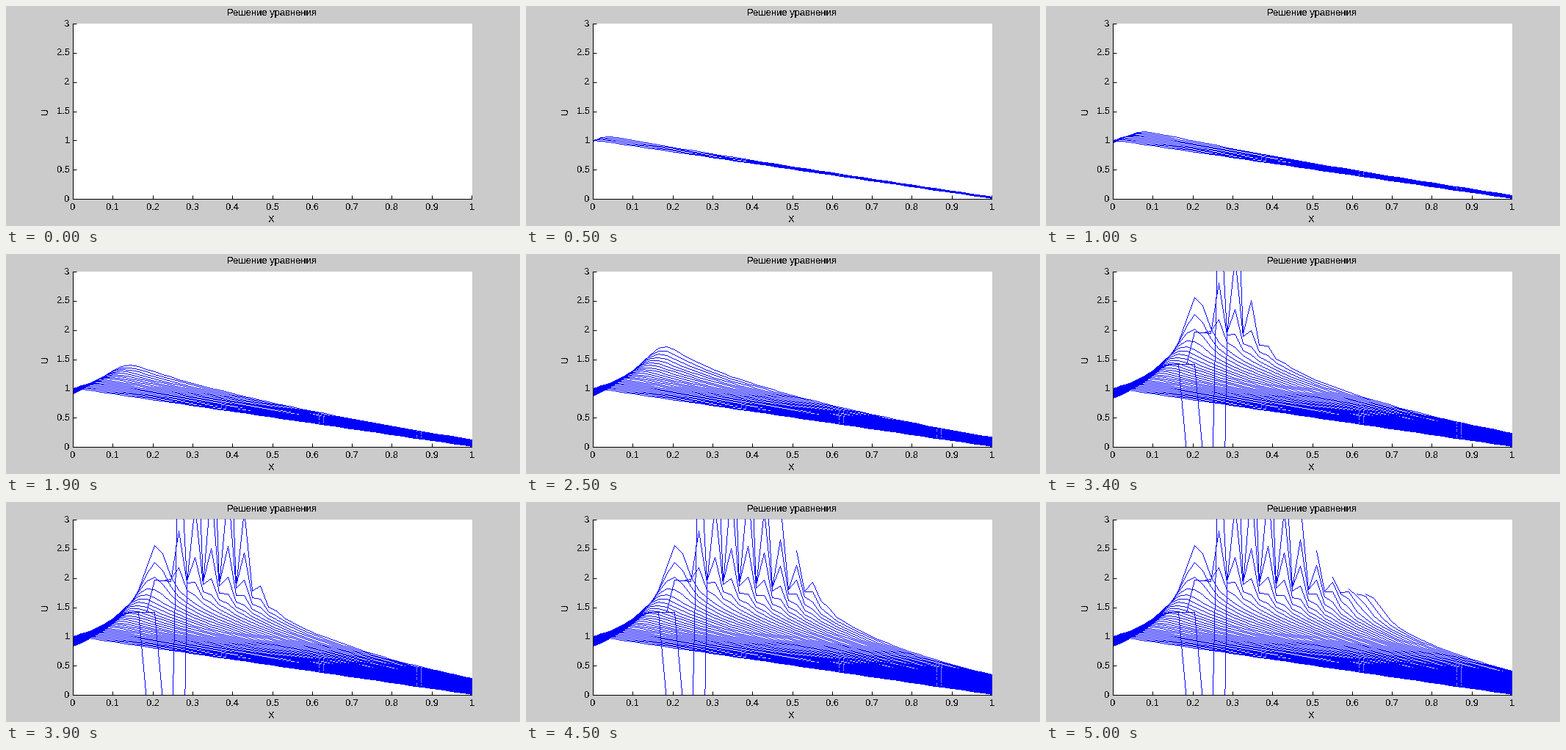
A matplotlib script for the animation above (5100 ms loop, 700 by 300 pixels).

```python
import numpy as np
import matplotlib.pyplot as plt
from matplotlib.animation import FuncAnimation

W, H, DPI = 700, 300, 100
LEFT, BOTTOM = 91, 37
AX_W, AX_H = 543, 239
U_MAX = 3
CURVES = 50
PX = 72 / DPI

plt.rcParams["font.family"] = "Liberation Sans"
plt.rcParams["font.size"] = 13 * PX
plt.rcParams["text.antialiased"] = False
plt.rcParams["path.simplify"] = False

cell = np.arange(50)
x = cell / 49

# Per step: advection speed, quadratic growth, fall of the inflow value
SPEED, GROWTH, DECAY = 0.0062, 0.0166, 0.0055
BREAK, LOST = 30, 34      # first unstable curve, first curve without a left part
FRONT = 19                # the overflow front of curve n is at cell n - FRONT


def smooth_wave(m):
    """Wave after m steps: the inflow branch meets the advected initial ramp."""
    inflow = 1 - DECAY * (m - x / SPEED)
    rise = inflow / np.maximum(1 - GROWTH / SPEED * x * inflow, 0.15)

    ramp = 1 - x + SPEED * m
    fall = ramp / np.maximum(1 - GROWTH * m * ramp, 0.2)
    fall = fall + 0.0053 * fall ** 8

    s = 0.01 * max(m, 1)
    u = -s * np.logaddexp(-rise / s, -fall / s)
    if m < BREAK - 1:
        peak = 0.05 * max(m - 24, 0) ** 1.6
        u += peak * np.exp(-((x - 0.21) / 0.03) ** 2)
    return u


def unstable_wave(n):
    """Sawtooth behind the front, with a collapsing wake on its left."""
    u = smooth_wave(n - 1)
    front = n - FRONT
    d = np.maximum(cell - front, 0)

    valley = 1.9 - 0.012 * (cell - 15)
    teeth = 4 * np.exp(-((n - 36) / 6) ** 2) * np.exp(-d / 1.15)
    teeth[(cell % 2 == 0) | (cell < 13)] = 0
    jagged = u + (valley - u) * np.exp(-(d / 2) ** 2) + teeth

    if n >= LOST:
        return np.where(cell < front, np.nan, jagged)
    edge = 10 - 2 * (n - 32)
    wake = np.minimum(u, 1.4 - 1.5 * np.maximum(cell - edge, 0))
    in_wake = (cell < front) & ((cell < 10) | (cell >= edge))
    return np.where(in_wake, wake, jagged)


def pixel_line(u):
    """Aliased one-pixel line as short dashes, one for each pixel."""
    col, row = np.rint(x * AX_W), np.rint(u / U_MAX * AX_H)
    cols, rows = [], []
    for c0, c1, r0, r1 in zip(col, col[1:], row, row[1:]):
        if np.isnan(r0 + r1):
            continue
        t = np.linspace(0, 1, int(max(c1 - c0, abs(r1 - r0))) + 1)
        cols.append(np.rint(c0 + (c1 - c0) * t))
        rows.append(np.rint(r0 + (r1 - r0) * t))
    cols, rows = np.concatenate(cols), np.concatenate(rows)
    shown = (rows >= 0) & (rows <= AX_H)
    cols, rows = cols[shown], rows[shown] + 0.5
    gap = np.full(len(cols), np.nan)
    xs = np.column_stack([cols, cols + 1, gap]).ravel() / AX_W
    ys = np.column_stack([rows, rows, gap]).ravel() / AX_H * U_MAX
    return xs, ys


fig = plt.figure(figsize=(W / DPI, H / DPI), dpi=DPI, facecolor="#cbcbcb")
ax = fig.add_axes([LEFT / W, BOTTOM / H, AX_W / W, AX_H / H])
ax.patch.set(facecolor="white", edgecolor="white", linewidth=PX)
ax.set(xlim=(0, 1), ylim=(0, U_MAX), autoscale_on=False)
ax.set_xticks(np.arange(11) / 10)
ax.set_yticks(np.arange(7) / 2)
ax.tick_params(direction="in", length=5 * PX, width=PX,
               labelleft=False, labelbottom=False)
for side, spine in ax.spines.items():
    spine.set_linewidth(PX)
    spine.set_visible(side in ("left", "bottom"))


def label(px, py, text, ha="center", va="baseline", **kw):
    fig.text(px / W, 1 - py / H, text, ha=ha, va=va, color="black", **kw)


for i in range(11):
    label(LEFT + 0.5 + i * AX_W / 10, 278, f"{i / 10:g}")
for i in range(7):
    label(87, H - BOTTOM + 3.6 - i * AX_H / 6, f"{i / 2:g}", ha="right")
label(362, 13, "Решение уравнения")
label(361, 295, "X")
label(53.5, 143.5, "U", va="center", rotation=90)

lines = []
for n in range(1, CURVES + 1):
    u = unstable_wave(n) if n >= BREAK else smooth_wave(n - 1)
    lines += ax.plot(*pixel_line(u), color="#0000ff", lw=PX, snap=False,
                     solid_capstyle="butt", clip_on=False)


def update(frame):
    for i, line in enumerate(lines):
        line.set_visible(i < frame)
    return lines


def init():
    return update(0)


anim = FuncAnimation(fig, update, frames=CURVES + 1, init_func=init,
                     interval=100, repeat=True, repeat_delay=0, blit=False)
plt.show()
```
